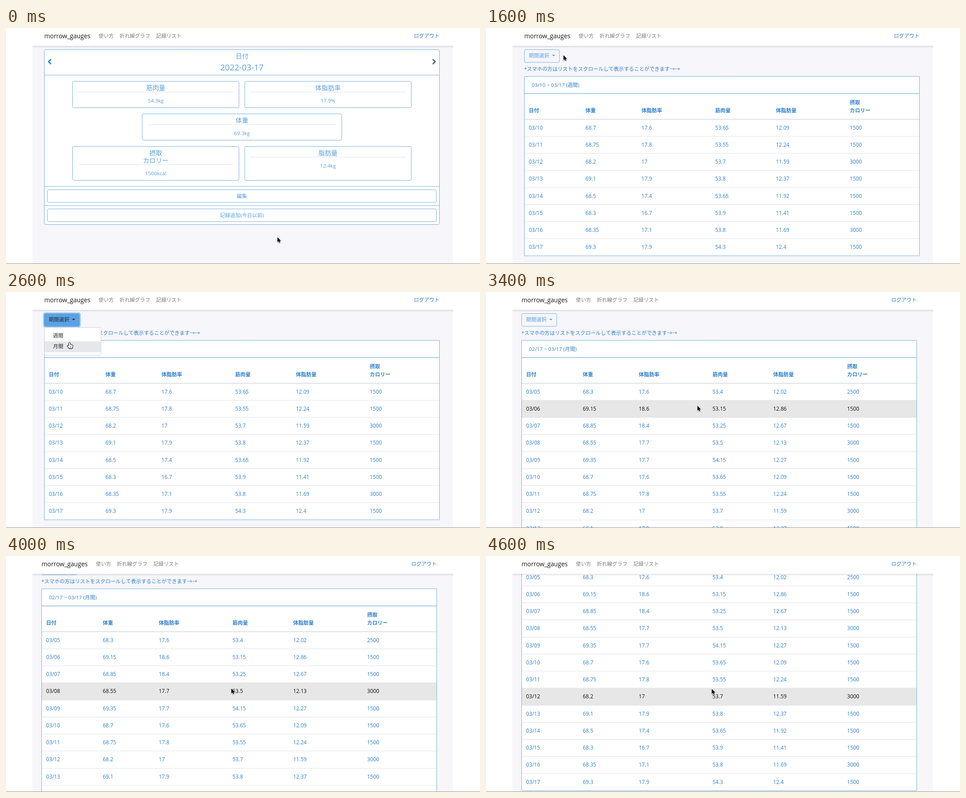
These frames come from a looping animation (1058 px wide and 529 px high, 4.8 s). An HTML page with a canvas:

```html
<!DOCTYPE html>
<html lang="ja">
<head>
<meta charset="utf-8">
<title>体重管理</title>
<style>
html, body { margin: 0; width: 100%; height: 100%; overflow: hidden; background: #fff; }
canvas { display: block; width: 1058px; height: 529px; }
</style>
</head>
<body>
<canvas id="stage" width="1058" height="529"></canvas>
<script>
const ctx = document.getElementById('stage').getContext('2d');
const STEP = 200, FONT = '"Open Sans", "Noto Sans CJK JP", "Noto Sans CJK", sans-serif';
const SOFT = '#5b9fd9', BLUE = '#2f7fc8', EDGE = '#79aed8', RULE = '#dee2e6', DARK = '#212529';

const COLUMNS = [95.5, 222, 347, 511.5, 647, 812];
const HEADERS = ['日付', '体重', '体脂肪率', '筋肉量', '体脂肪量', 'カロリー'];
const RECORDS = `03/05 68.3 17.6 53.4 12.02 2500
03/06 69.15 18.6 53.15 12.86 1500
03/07 68.85 18.4 53.25 12.67 1500
03/08 68.55 17.7 53.5 12.13 3000
03/09 69.35 17.7 54.15 12.27 1500
03/10 68.7 17.6 53.65 12.09 1500
03/11 68.75 17.8 53.55 12.24 1500
03/12 68.2 17 53.7 11.59 3000
03/13 69.1 17.9 53.8 12.37 1500
03/14 68.5 17.4 53.65 11.92 1500
03/15 68.3 16.7 53.9 11.41 1500
03/16 68.35 17.1 53.8 11.69 3000
03/17 69.3 17.9 54.3 12.4 1500`.split('\n').map(line => line.split(' '));
const ROW_TOP = 204.7, ROW_HEIGHT = 38.25;

const at = (x, y, page, more) => ({ x, y, page, scroll: 0, ...more });
const link = { hand: true, linkHover: true };
const STATES = [
  at(606, 469, 'home'), at(518, 270, 'home'),
  at(365, 15, 'home', link), at(362, 15, 'home', link), at(362, 15, 'home', link),
  at(362, 15, 'week', link),
  at(315, 50, 'week'), at(242, 70, 'week'), at(173, 61, 'week'),
  at(140, 57, 'week', { hand: true, button: 'hover' }),
  at(140, 57, 'week', { hand: true, button: 'open' }),
  at(139, 84, 'week', { button: 'open' }),
  at(141, 95, 'week', { hand: true, button: 'open', item: 0 }),
  at(142, 113, 'week', { hand: true, button: 'open', item: 1 }),
  at(140, 113, 'week'), at(140, 113, 'week'), at(227, 150, 'week'),
  at(472, 255, 'month'), at(492, 288, 'month'),
  at(498, 296, 'month', { scroll: 3.7 }), at(503, 297, 'month', { scroll: 35 }),
  at(504, 298, 'month', { scroll: 82.3 }), at(504, 298, 'month', { scroll: 175 }),
  at(504, 298, 'month', { scroll: 176.2 })
];

function text(str, x, y, color = BLUE, size = 11.4, align = 'left', weight = 400) {
  ctx.font = `${weight} ${size}px ${FONT}`;
  ctx.textAlign = align;
  ctx.fillStyle = color;
  ctx.fillText(str, x, y);
}

function rect(x, y, w, h, color) {
  ctx.fillStyle = color;
  ctx.fillRect(x, y, w, h);
}

function box(x1, y1, x2, y2, fill, stroke, radius = 3) {
  ctx.beginPath();
  ctx.roundRect(x1, y1, x2 - x1, y2 - y1, radius);
  if (fill) { ctx.fillStyle = fill; ctx.fill(); }
  if (stroke) { ctx.strokeStyle = stroke; ctx.lineWidth = 1; ctx.stroke(); }
}

function shape(path, x, y, fill, stroke, width) {
  const p = new Path2D(path);
  ctx.save();
  ctx.translate(x, y);
  ctx.lineJoin = 'round';
  if (stroke) { ctx.strokeStyle = stroke; ctx.lineWidth = width; ctx.stroke(p); }
  if (fill) { ctx.fillStyle = fill; ctx.fill(p); }
  ctx.restore();
}

function card(x1, y1, x2, y2, lines, value) {
  const mid = (x1 + x2) / 2, shift = 17 * (lines.length - 1);
  box(x1, y1, x2, y2, '#fff', EDGE);
  lines.forEach((s, i) => text(s, mid, y1 + 19.5 + 17 * i, SOFT, 14.2, 'center'));
  rect(x1 + 12.5, y1 + 23.5 + shift, x2 - x1 - 25, 1, RULE);
  text(value, mid, y1 + 47 + shift, SOFT, 11.6, 'center');
}

function drawHome() {
  box(85.5, 48.5, 967.5, 440.5, '#fff', EDGE);
  text('日付', 527, 68, SOFT, 14.2, 'center');
  text('2022-03-17', 526.5, 94.5, SOFT, 18.5, 'center');
  shape('M3 -5.5 L-2.5 0 L3 5.5', 97.5, 75.5, null, '#2f7dcb', 3);
  shape('M-3 -5.5 L2.5 0 L-3 5.5', 955.5, 75.5, null, '#57616b', 3);
  for (const y of [105, 354.5, 397.5]) rect(86, y, 881, 1, EDGE);
  card(148.5, 119.5, 520, 178.5, ['筋肉量'], '54.3kg');
  card(533, 119.5, 904.5, 178.5, ['体脂肪率'], '17.9%');
  card(304, 192.5, 749.5, 251.5, ['体重'], '69.3kg');
  card(148.5, 265.5, 520, 341.5, ['摂取', 'カロリー'], '1500kcal');
  card(533, 265.5, 904.5, 341.5, ['脂肪量'], '12.4kg');
  [['編集', 362.5], ['記録追加(今日以前)', 405.5]].forEach(([label, y]) => {
    box(92.5, y, 960.5, y + 28.5, '#fff', EDGE);
    text(label, 526.5, y + 18, SOFT, 11.4, 'center');
  });
}

function drawTable(state) {
  const month = state.page === 'month';
  const rows = month ? RECORDS : RECORDS.slice(5);
  const bottom = ROW_TOP + rows.length * ROW_HEIGHT;
  const hovered = Math.floor((state.y + state.scroll - ROW_TOP) / ROW_HEIGHT);
  text('*スマホの方はリストをスクロールして表示することができます→→', 85, 96);
  box(85.5, 108.5, 967.5, bottom, '#fff', EDGE, 0);
  rect(85, 146.3, 883, 1.3, EDGE);
  text(month ? '02/17 ~ 03/17 (月間)' : '03/10 ~ 03/17 (週間)', 102, 131.5, BLUE, 11.5);
  HEADERS.forEach((s, i) => text(s, COLUMNS[i], 188.5, BLUE, 11.5, 'left', 700));
  text('摂取', COLUMNS[5], 170.5, BLUE, 11.5, 'left', 700);
  rect(86, 203.8, 881, 1.6, '#d5dade');
  rows.forEach((row, r) => {
    const y = ROW_TOP + r * ROW_HEIGHT, active = r === hovered;
    if (active) rect(86, y, 881, ROW_HEIGHT, '#e7e7e7');
    if (r) rect(86, Math.round(y - state.scroll) - .5 + state.scroll, 881, 1, RULE);
    row.forEach((s, c) => text(s, COLUMNS[c], y + 23, active ? '#111' : BLUE, 11.8));
  });
  if (!month) rect(85, 522, 883, 1, '#e6e7ec');
}

function drawPeriodMenu({ button, item }) {
  const active = Boolean(button), ink = active ? DARK : SOFT;
  if (button === 'open') box(82.5, 45.5, 167, 80, '#abcff0', null, 5);
  box(85.5, 48.5, 164, 77, active ? '#5aa2e4' : null, active ? '#5aa2e4' : EDGE);
  text('期間選択', 95.5, 66, ink);
  shape('M-3.5 -1.7 H3.5 L0 1.8 Z', 150.8, 61.7, ink);
  if (button !== 'open') return;
  box(85.5, 79.5, 212, 141.5, '#fff', '#cfd0d4');
  if (item !== undefined) rect(86, 86 + item * 24.5, 125.5, 24.5, '#e6e7eb');
  text('週間', 105, 101.5, DARK);
  text('月間', 105, 126, DARK);
}

function drawNav(shift, linkHover) {
  rect(59, 0, 939, 40, '#fff');
  const shadow = ctx.createLinearGradient(0, 40, 0, 45);
  shadow.addColorStop(0, 'rgba(0,0,0,.11)');
  shadow.addColorStop(1, 'rgba(0,0,0,0)');
  rect(59, 40, 939, 5, shadow);
  text('morrow_gauges', 85.5 + shift, 23, '#1b1b1b', 13.8);
  text('使い方', 206.5 + shift, 22, '#7c7c7c');
  text('折れ線グラフ', 253.5 + shift, 22, '#7c7c7c');
  text('記録リスト', 335 + shift, 22, linkHover ? '#4c4c4c' : '#7c7c7c');
  text('ログアウト', 910.5 + shift, 22);
}

function drawCursor({ x, y, hand }) {
  ctx.save();
  ctx.shadowColor = 'rgba(0,0,0,.3)';
  ctx.shadowBlur = 2;
  ctx.shadowOffsetY = 1;
  if (hand) {
    shape('M-1.5 8 V1.5 Q-1.5 .3 -.3 .3 Q1 .3 1 1.5 V5 Q2.5 4.2 3.3 5.4 Q4.8 4.8 5.3 6.2 Q6.8 6 6.8 7.6 Q6.8 10.5 5.2 13 H-.8 Q-2.5 10.5 -4.6 8.2 Q-5 6.6 -3.4 6.7 Z',
      x, y, '#fff', '#111', 1.8);
    shape('M1.2 8.5 V11 M3.1 8.5 V11', x, y, null, '#333', .7);
  } else {
    shape('M0 0 V10.8 L2.5 8.5 L4.2 12.3 L6 11.5 L4.3 7.9 H7.6 Z', x, y, '#000', '#fff', 1.6);
  }
  ctx.restore();
}

function draw(now) {
  const state = STATES[Math.floor(now / STEP) % STATES.length];
  const shift = state.page === 'month' ? -6 : 0;
  rect(0, 0, 1058, 529, '#fff');
  rect(59, 40, 939, 489, '#f6f6fb');
  ctx.save();
  ctx.translate(shift, -state.scroll);
  if (state.page === 'home') {
    drawHome();
  } else {
    drawTable(state);
    drawPeriodMenu(state);
  }
  ctx.restore();
  drawNav(shift, state.linkHover);
  rect(0, 528, 1058, 1, '#8c8c90');
  drawCursor(state);
  requestAnimationFrame(tick);
}

function tick() { draw(performance.now()); }
tick();
</script>
</body>
</html>
```
